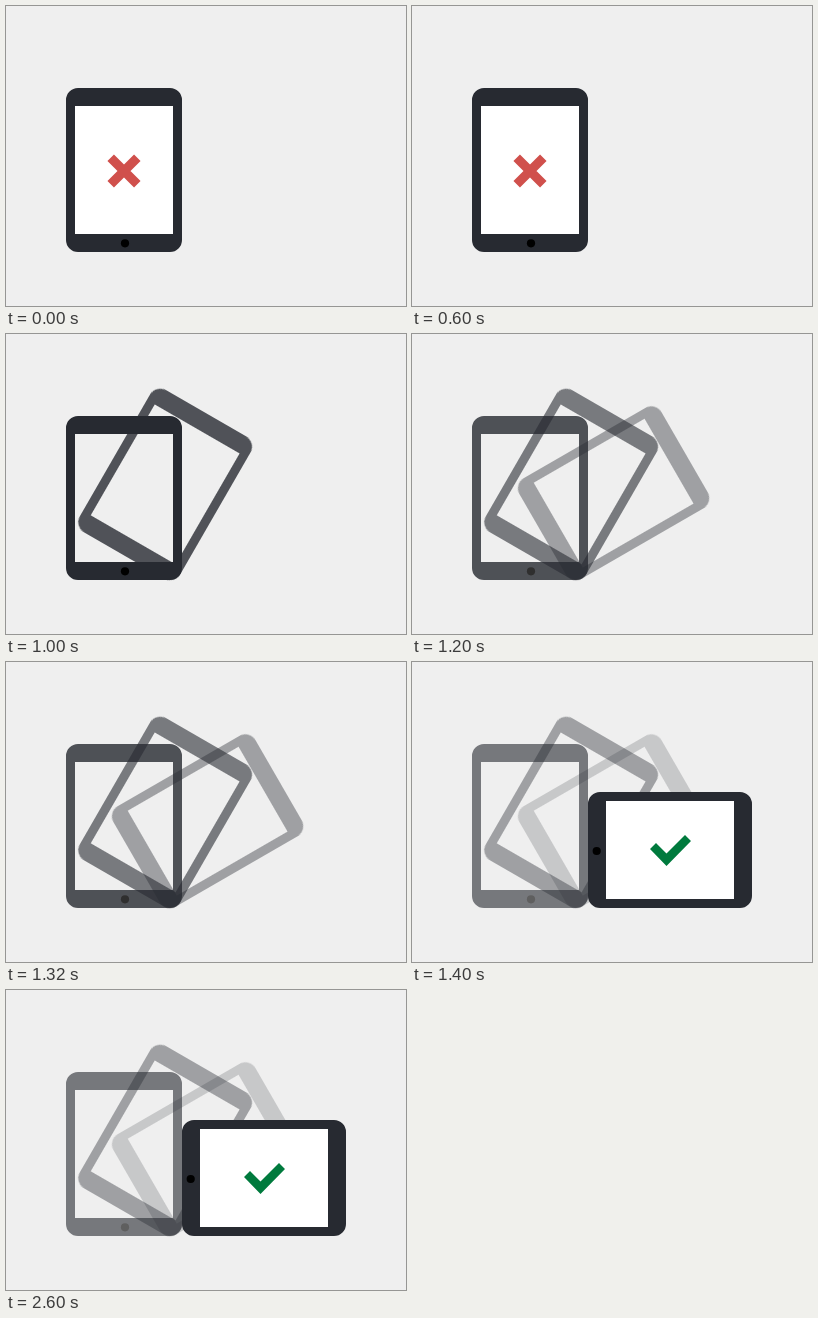
An HTML page for the animation above (3400 ms loop, 400 by 300 pixels).

```html
<!DOCTYPE html>
<html lang="en">
<head>
<meta charset="utf-8">
<title>Rotate your tablet</title>
<style>
  html, body { margin: 0; width: 100%; height: 100%; overflow: hidden; background: #efefef; }
  svg { display: block; width: 100vw; height: 100vh; }
  .body { fill: #272a31; fill-rule: evenodd; }
</style>
</head>
<body>
<svg viewBox="0 0 400 300">
  <defs>
    <!-- Upright tablet outline with an open screen -->
    <path id="frame" class="body" d="M72 82H164a12 12 0 0 1 12 12V234a12 12 0 0 1 -12 12H72a12 12 0 0 1 -12 -12V94a12 12 0 0 1 12 -12ZM69 100V228H167V100Z"/>
    <g id="tablet">
      <use href="#frame"/>
      <circle cx="119" cy="237.3" r="4.1"/>
    </g>
  </defs>

  <!-- The tablet tips over around the centre of its lower right corner -->
  <use id="tilt60" href="#frame" transform="rotate(60 164 234)"/>
  <use id="tilt30" href="#frame" transform="rotate(30 164 234)"/>
  <use id="upright" href="#tablet"/>

  <g id="wrong">
    <path fill="#fff" d="M69 100h98v128h-98z"/>
    <path stroke="#d0504c" stroke-width="9.2" d="M104.7 151.7l26.6 26.6m0 -26.6l-26.6 26.6"/>
  </g>

  <g id="landscape">
    <path fill="#fff" d="M194 139h128v98h-128z"/>
    <use href="#tablet" transform="translate(24 0) rotate(90 164 234)"/>
    <path fill="#007a3d" d="M238 187l6 -6 10.5 10.5L273 173l6 6 -24.5 25z"/>
  </g>
</svg>
<script>
  const LOOP = 3400;
  const STARTS = [0, 1000, 1200, 1400];

  // Opacity of each part during the four steps
  const OPACITY = {
    upright:   [1, 1, 0.8, 0.6],
    tilt30:    [0, 0.8, 0.6, 0.4],
    tilt60:    [0, 0, 0.4, 0.2],
    wrong:     [1, 0, 0, 0],
    landscape: [0, 0, 0, 1]
  };

  for (const [id, levels] of Object.entries(OPACITY)) {
    const frames = levels.map((opacity, i) => ({
      opacity, offset: STARTS[i] / LOOP, easing: 'step-end'
    }));
    frames.push({ opacity: levels.at(-1), offset: 1 });
    const animation = document.getElementById(id).animate(frames, { duration: LOOP, iterations: Infinity });
    animation.startTime = 0;
  }
</script>
</body>
</html>
```
